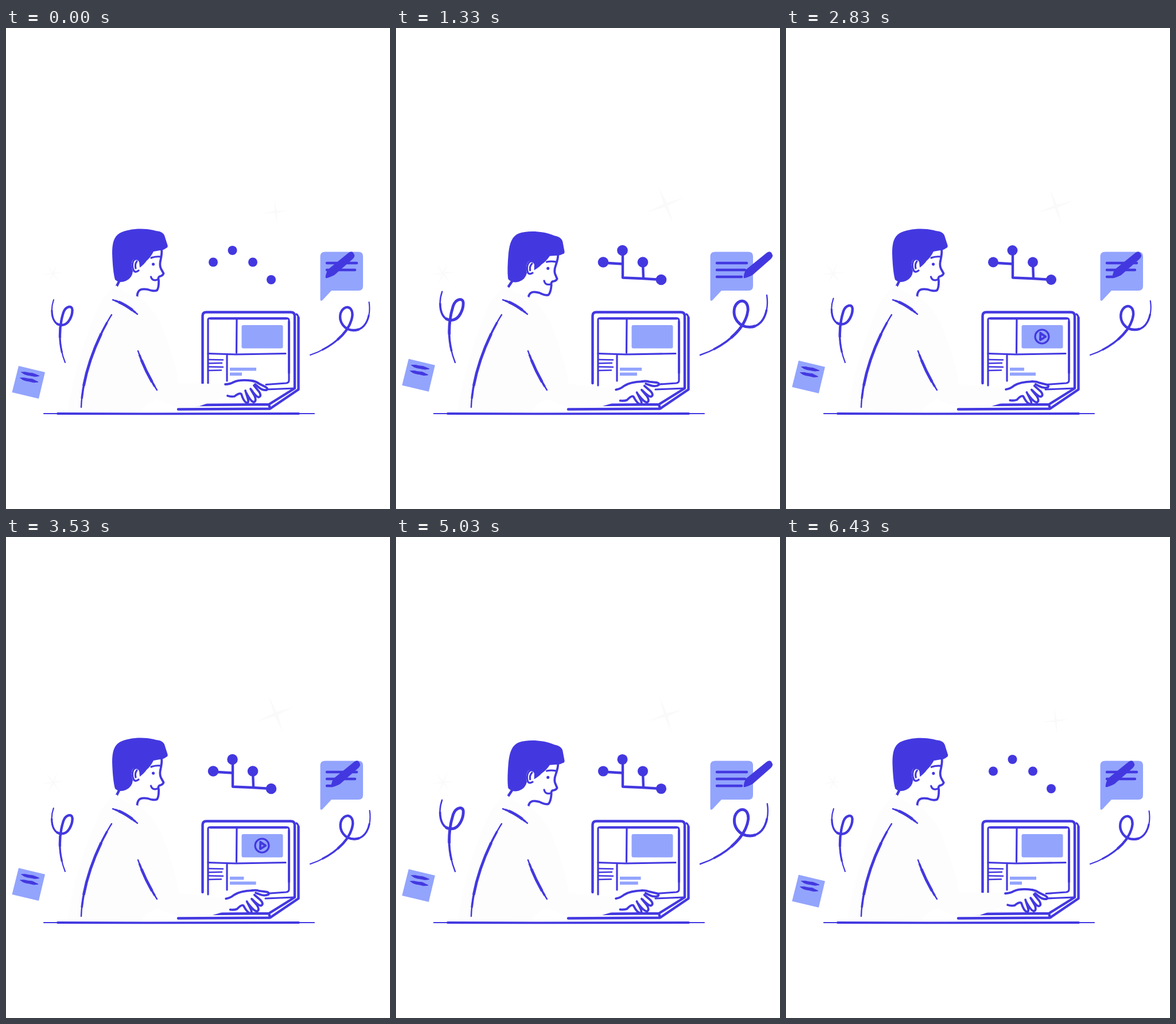
Write an HTML page that moves like this. It is 669x837 px and loops after 6.51 s.

```html
<!DOCTYPE html>
<html lang="en">
<head>
<meta charset="utf-8">
<title>At the laptop</title>
<style>
html, body { margin: 0; width: 100%; height: 100%; overflow: hidden; background: #fff; }
svg { display: block; width: 100vw; height: 100vh; }
.ink { fill: none; stroke: #4338e0; stroke-width: 4.4; stroke-linecap: round; stroke-linejoin: round; }
.thin { stroke-width: 3.2; }
.hand .ink { stroke-width: 3.8; }
.dark { fill: #4338e0; }
.light { fill: #93a4fd; }
.shirt { fill: #fdfdfd; }
.spark { fill: #fafafa; }
.skin { fill: #fff; }
</style>
</head>
<body>
<svg viewBox="0 0 669 837">
  <path class="spark" id="star"/>
  <path class="spark" id="starLeft"/>

  <!-- network -->
  <g class="ink" id="links">
    <path pathLength="1" d="M361 408.500L394 410.500"/>
    <path pathLength="1" d="M395 389V434.500L430 436L462 438"/>
    <path pathLength="1" d="M430 408L431 435"/>
  </g>
  <g class="dark" id="dots">
    <circle cx="361" cy="407.5"/><circle cx="394.5" cy="387"/>
    <circle cx="430" cy="407.5"/><circle cx="462" cy="438"/>
  </g>

  <!-- message and pencil -->
  <path class="light" d="M556 389.500H614Q622 389.500 622 397.500V449Q622 457 614 457H567L551 474Q547.500 476 547.500 472V397.500Q547.500 389.500 556 389.500Z"/>
  <path class="ink" d="M559 409H611M559 421H608"/>
  <path class="ink" id="written"/>
  <path class="dark" id="pencil" d="M557 435Q555.500 433 560 421L597 391Q602 387.500 605 391L607 395Q608 398 604 402L572 430Q560 436 557 435Z"/>

  <g id="curlLeft"></g>
  <g id="curlRight"></g>

  <g id="note">
    <path class="light" d="M22 588L68 599L57 645L10.500 634Z"/>
    <path class="ink dark" style="fill:#4338e0;stroke-width:1" d="M27 599Q34 598 39 600L47 601Q53 603 58 605.500Q50 607.500 43 605L37 604Q31 603 27 599ZM25 609Q32 608 37 610L46 611Q52 614 56 616Q48 618 41 615L35 614Q29 613 25 609Z"/>
  </g>

  <!-- laptop -->
  <path class="ink" d="M342.500 618V501Q342.500 494.500 349 494.500H496Q503 494.500 503 501V627L458 655L338 656H300M509.500 504V629L460 662.500L300 663.500M458 655L460 662"/>
  <path class="ink thin" d="M506 498Q509.500 500 509.500 506M352 622V508Q352 505 355 505H489Q493 505 493 509V613Q493 617.500 488 618L453 620.500M452 629L502 627"/>
  <path class="ink" d="M356 505.500H489M493 511V600" style="stroke-width:3.800"/>
  <path class="ink thin" d="M402 507L401.500 565M352 566.500L400 568L487 566.500M385 570V614"/>
  <path class="ink" style="stroke-width:2.500" d="M353 577L378 577.500M353 583.500L376 583M353 589.500L378 590M353 596L375 595.500"/>
  <rect class="light" x="410.500" y="517" width="72" height="40.500" rx="3"/>
  <g id="play">
    <circle class="ink thin" cx="446" cy="537" r="12"/>
    <path class="dark" d="M441.500 530Q441.500 528 444 529L453.500 535.500Q455 537 453.500 538.500L444 544.500Q441 545.500 441 542Z"/>
    <path class="light" d="M445 535L449 537L445 539.500Z"/>
  </g>
  <rect class="light" id="barTop" x="390" y="591" height="5.500"/>
  <rect class="light" id="barLow" x="390" y="599.500" height="5.500"/>

  <!-- head -->
  <g id="head">
    <path class="skin" d="M197 436L190 460L228 468Q229 456 236 455Q252 457 262 458Q267 448 267 435L275 427Q269 418 271 386H225Z"/>
    <path class="dark" d="M185 392C185 374 188 363 198 357C213 349 241 347 261 353Q275 354 277 364L281.500 378Q282.500 382 279 383Q274 387 268 387L257 389Q252 399 245 405Q241 411 233 417L232 407Q226 397 220 405Q217 414 221 423Q220 435 209 440Q198 445 190 438Q186 424 185 392Z"/>
    <path class="ink thin" d="M232 404Q226 399 221.500 406Q218.500 415 223 423Q226 426 231 422M228 406Q224 411 226 418"/>
    <path class="ink" style="stroke-width:3.800" d="M271 386Q272 391 269.500 403Q267 413 270 419L274.500 427Q273.500 431 267 432.500Q264.500 435 266 439Q266.500 452 263 456.500Q258 459 247 455Q236 453 232 457Q228 461 228.500 470"/>
    <path class="ink thin" d="M253 400Q260 397 270 398M252.500 433Q255 441 263.500 438"/>
    <circle class="dark" cx="256.500" cy="411" r="2.600"/>
    <path class="ink" d="M197 441L192 451"/>
  </g>

  <!-- torso and arm -->
  <path class="shirt" d="M192 448Q177 457 162 482Q121 575 107 669H236Q240 655 263 646L302 661L300 610Q292 570 270 515Q254 482 229 467Q208 464 192 448Z"/>
  <path class="shirt" id="forearm"/>
  <g id="body"></g>
  <path class="ink" style="stroke-width:2.200" d="M66 671H537"/>
  <path class="ink" style="stroke-width:3.800" d="M90 671L240 671.300L510 671"/>

  <g class="hand" id="hand">
    <path class="skin" d="M382 620L402 614L430 613L445 625L441 641L434 650L420 651L408 636L387 640Z"/>
    <path class="ink" d="M386 640Q392 642 398 641Q407 634 410 637Q414 650 419 652Q424 653 421 644L417 631M418 634Q427 651 432 651Q437 649 433 640L426 628M427 629Q436 642 440 642.500Q446 641 441 633L432 622"/>
    <g id="finger">
      <path class="skin" d="M428 614Q446 619 455 627Q450 632 435 622Z"/>
      <path class="ink" d="M429 614Q436 615 441 619L453 625Q457 628 454 630Q447 631 440 625L434 620"/>
    </g>
    <path class="ink" d="M382 620Q390 620 397 616Q408 611 430 614"/>
  </g>
</svg>
<script>
const LOOP = 6510;
const el = id => document.getElementById(id);
const set = (id, name, value) => el(id).setAttribute(name, value);
const move = (id, value) => set(id, "transform", value);
const ease = u => (u = Math.min(1, Math.max(0, u)), u * u * (3 - 2 * u));
const ramp = (t, from, to) => ease((t - from) / (to - from));
const pulse = (t, inA, inB, outA, outB) => ramp(t, inA, inB) - ramp(t, outA, outB);
const wave = (t, cycles) => (1 - Math.cos(2 * Math.PI * cycles * t / LOOP)) / 2;

// Brush line: thin at both ends, full width in the middle.
function brush(id, d, width) {
  el(id).innerHTML += `<path class="ink" d="${d}" style="stroke-width:${width * 0.5}"/>` +
    `<path class="ink" d="${d}" pathLength="100" stroke-dasharray="0 9 82 100" style="stroke-linecap:butt;stroke-width:${width * 0.75}"/>` +
    `<path class="ink" d="${d}" pathLength="100" stroke-dasharray="0 22 56 100" style="stroke-linecap:butt;stroke-width:${width}"/>`;
}
brush("curlLeft", "M83 473C77 490 79 517 97 517C110 517 116 499 115.500 490C115 482 104 484 100 495C92 520 91 552 103 582", 4.3);
brush("curlRight", "M530 569C566 557 600 530 603.500 500C604 482 588 482 583 496C579 512 590 526 606 526C628 526 636 500 632.500 477", 4.3);
brush("body", "M186 473Q207 479 229 498", 4.8);
brush("body", "M184 499C160 537 133 602 131 660", 4.8);
brush("body", "M230 562Q242 597 263 630", 4.8);

function star(x, y, r, points, turn) {
  let d = "";
  for (let i = 0; i < points * 2; i++) {
    const a = Math.PI * i / points - turn, q = i % 2 ? r * 0.12 : r;
    d += (i ? "L" : "M") + (x + q * Math.cos(a)) + " " + (y + q * Math.sin(a));
  }
  return d + "Z";
}

function draw(t) {
  const nod = pulse(t, 0, 651, 1953, 2604) + pulse(t, 3906, 4557, 5859, LOOP);
  move("head", `rotate(${7 * nod} 200 482)`);

  const grow = 1 + 0.143 * wave(t, 2);
  move("curlLeft", `translate(103 582) scale(${grow}) translate(-103 -582)`);
  move("curlRight", `translate(530 569) scale(${grow}) translate(-530 -569)`);

  const bob = wave(t, 3);
  move("note", `translate(0 ${-14 * bob})`);
  for (const dot of el("dots").children) dot.setAttribute("r", 8 + 1.5 * bob);
  set("star", "d", star(470, 320 - 14 * bob, 22 + 14 * bob, 4, 0.1 + 0.32 * bob));
  set("starLeft", "d", star(82, 427, 18 + 4 * bob, 6, 0.1));

  // Typing arm
  const phase = t * 3 / LOOP % 1;
  const press = ease(Math.min(phase, 1 - phase) / 0.36);
  move("hand", `translate(${4 * press} ${1.5 * press}) rotate(${-10 * press} 426 640)`);
  move("finger", `rotate(${-18 * bob ** 4} 428 614)`);
  set("forearm", "d", `M270 560L298 619L383 ${619 + 9 * press}L${388 + 2 * press} ${640 + 9 * press}` +
    `L${337 + 23 * press} 658L300 661L265 645Z`);

  // Pencil and the line it writes
  const u = t % (LOOP / 2);
  const write = pulse(u, 0, 960, 2050, 3200);
  move("pencil", `translate(${49 * write} 0)`);
  set("written", "d", write > 0.01 ? `M559 433H${559 + 43 * write}` : "");

  const linked = pulse(t, 650, 1300, 5208, 5859);
  set("links", "stroke-dasharray", `${linked} 2`);
  set("links", "visibility", linked > 0.005 ? "visible" : "hidden");
  set("play", "opacity", pulse(t, 1480, 1930, 4580, 5030));

  const slow = wave(t, 1);
  set("barTop", "width", 46 - 22 * slow);
  set("barLow", "width", 21 + 25 * slow);
}

function tick() {
  draw(performance.now() % LOOP);
  requestAnimationFrame(tick);
}
tick();
</script>
</body>
</html>
```
